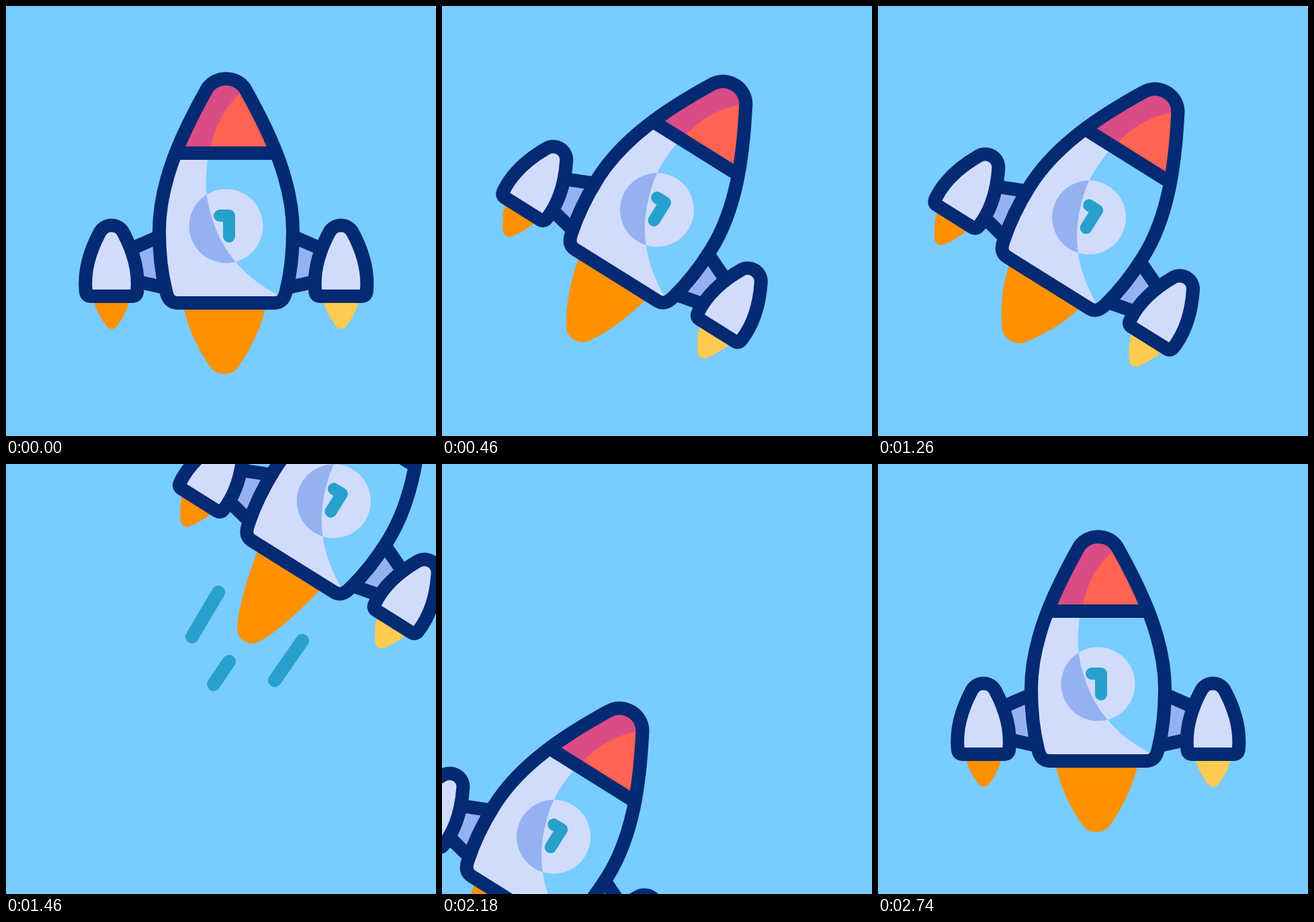
These frames come from a looping animation (640 by 640 pixels, 2920 ms). An HTML page:

```html
<!DOCTYPE html>
<html lang="en">
<head>
<meta charset="utf-8">
<title>Rocket</title>
<style>
  html, body { margin: 0; width: 100%; height: 100%; overflow: hidden; background: #78ccff; }
  svg { display: block; width: 100vw; height: 100vh; }
  .line { fill: none; stroke: #032a73; stroke-width: 20; stroke-linejoin: round; }
  .teal { fill: none; stroke: #27a1cc; stroke-linecap: round; stroke-linejoin: round; }
</style>
</head>
<body>
<svg viewBox="0 0 640 640">
  <defs>
    <path id="hull" d="M297 127C309 102 346 102 358 127C393 190 427 262 427 335C427 370 423 400 417 424C414 438 408 442 399 442H256C247 442 241 438 238 424C232 400 228 370 228 335C228 262 262 190 297 127Z"/>
    <path id="shade" d="M200 229H300C296 262 297 285 305 310C318 357 347 400 406 431V460H200Z"/>
    <path id="jet" d="M130 436C133 450 140 463 148 474C152 482.5 163 482.5 167 474C175 463 181 450 185 436Z"/>
    <g id="booster">
      <path class="line" style="fill:#94b2f2" d="M170 368.5L240 338V420L170 404.5Z"/>
      <path class="line" style="fill:#d1dcfc" d="M126 432C121 432 119 429 118.7 424C116 395 124 366 139.5 337C147 323 167 323 174.5 337C190 366 198 395 195.3 424C195 429 193 432 188 432Z"/>
    </g>
    <clipPath id="inHull"><use href="#hull"/></clipPath>
    <clipPath id="inShade"><use href="#shade"/></clipPath>
  </defs>
  <rect width="640" height="640" fill="#78ccff"/>
  <g id="trails" class="teal" stroke-width="20">
    <path pathLength="1" d="M316 191L277 257"/>
    <path pathLength="1" d="M332 294L309 328"/>
    <path pathLength="1" d="M441 263L400 322"/>
  </g>
  <g id="rocket">
    <path id="flame" fill="#ff9100"/>
    <g id="jets">
      <use href="#jet" fill="#ff9100"/>
      <use href="#jet" x="341.5" fill="#ffcb50"/>
    </g>
    <use href="#booster"/>
    <use href="#booster" transform="translate(655.5) scale(-1 1)"/>
    <g clip-path="url(#inHull)">
      <rect x="200" y="90" width="260" height="370" fill="#78ccff"/>
      <use href="#shade" fill="#d1dcfc"/>
      <rect x="240" y="90" width="180" height="129" fill="#ff6353"/>
      <path fill="#da4c86" d="M240 90H350V129C328 148 312 175 305 209V219H240Z"/>
    </g>
    <circle cx="327.5" cy="327.5" r="55" fill="#d1dcfc"/>
    <circle cx="327.5" cy="327.5" r="55" fill="#94b2f2" clip-path="url(#inShade)"/>
    <path class="teal" stroke-width="18" d="M318 312H332V343"/>
    <path class="line" d="M254 219H401"/>
    <use href="#hull" class="line"/>
  </g>
</svg>
<script>
const LOOP = 2920, STEP = 20, CENTER = 327.5;
const BEAT = 1000 / 3, READY = 277, LAUNCH = READY + 3 * BEAT, RETURN = 1893, LANDED = 2393;
const byId = id => document.getElementById(id);
const rocket = byId('rocket'), flame = byId('flame'), jets = byId('jets'), trails = byId('trails');

const ease = u => u * u * (3 - 2 * u);
const smooth = (t, from, to) => ease(Math.min(1, Math.max(0, (t - from) / (to - from))));

// Hover: 0 at the top, 1 at the bottom, turning on every beat until launch.
function hover(t) {
  const beats = Math.min(3, Math.max(0, (t - READY) / BEAT));
  const triangle = 1 - Math.abs(beats % 2 - 1);
  return ease(triangle);
}

function position(t) {
  if (t >= RETURN) {
    const away = 1 - smooth(t, RETURN, LANDED);
    return [-414 * away, 583 * away];
  }
  const lift = smooth(t, 0, READY), dip = hover(t), fly = smooth(t, LAUNCH, LAUNCH + 500);
  return [lift / 2 - 14 * dip + 572 * fly, -39.5 * lift + 27 * dip - 855 * fly];
}

// A longer flame is also narrower, and the side jets pull in.
function drawFlames(t) {
  const stretch = t < RETURN
    ? 25 * smooth(t, 0, 167) - 28 * hover(t) + 30 * smooth(t, LAUNCH, 1460) : 0;
  const low = y => y + stretch;
  const squeeze = 1 - stretch * .0036;
  flame.setAttribute('d', `M264 445C270 480 288 ${low(515)} 305 ${low(538)}` +
    `C313 ${low(551)} 337 ${low(551)} 345 ${low(538)}C363 ${low(513)} 380 480 387 445Z`);
  flame.setAttribute('transform', `translate(${325.5 * (1 - squeeze)}) scale(${squeeze} 1)`);
  jets.setAttribute('transform', `translate(0 ${-Math.max(0, stretch) * .13})`);
}

function drawTrails(t) {
  const travel = smooth(t, LAUNCH, 1610) - .574;
  const length = smooth(t, 1340, 1443) - smooth(t, 1610, 1693);
  trails.style.display = length > 0 ? '' : 'none';
  trails.setAttribute('transform', `translate(${293 * travel} ${-451 * travel})`);
  trails.setAttribute('stroke-dasharray', length < 1 ? `${length} 2` : 'none');
}

function draw(t) {
  const [x, y] = position(t);
  const angle = 32 * (smooth(t, 0, READY) - smooth(t, LANDED, LANDED + BEAT));
  rocket.setAttribute('transform',
    `translate(${CENTER + x} ${CENTER + y}) rotate(${angle}) translate(${-CENTER} ${-CENTER})`);
  drawFlames(t);
  drawTrails(t);
}

const start = performance.now();
function tick() {
  const t = (performance.now() - start) % LOOP;
  draw(Math.floor(t / STEP) * STEP);
  requestAnimationFrame(tick);
}
tick();
</script>
</body>
</html>
```
